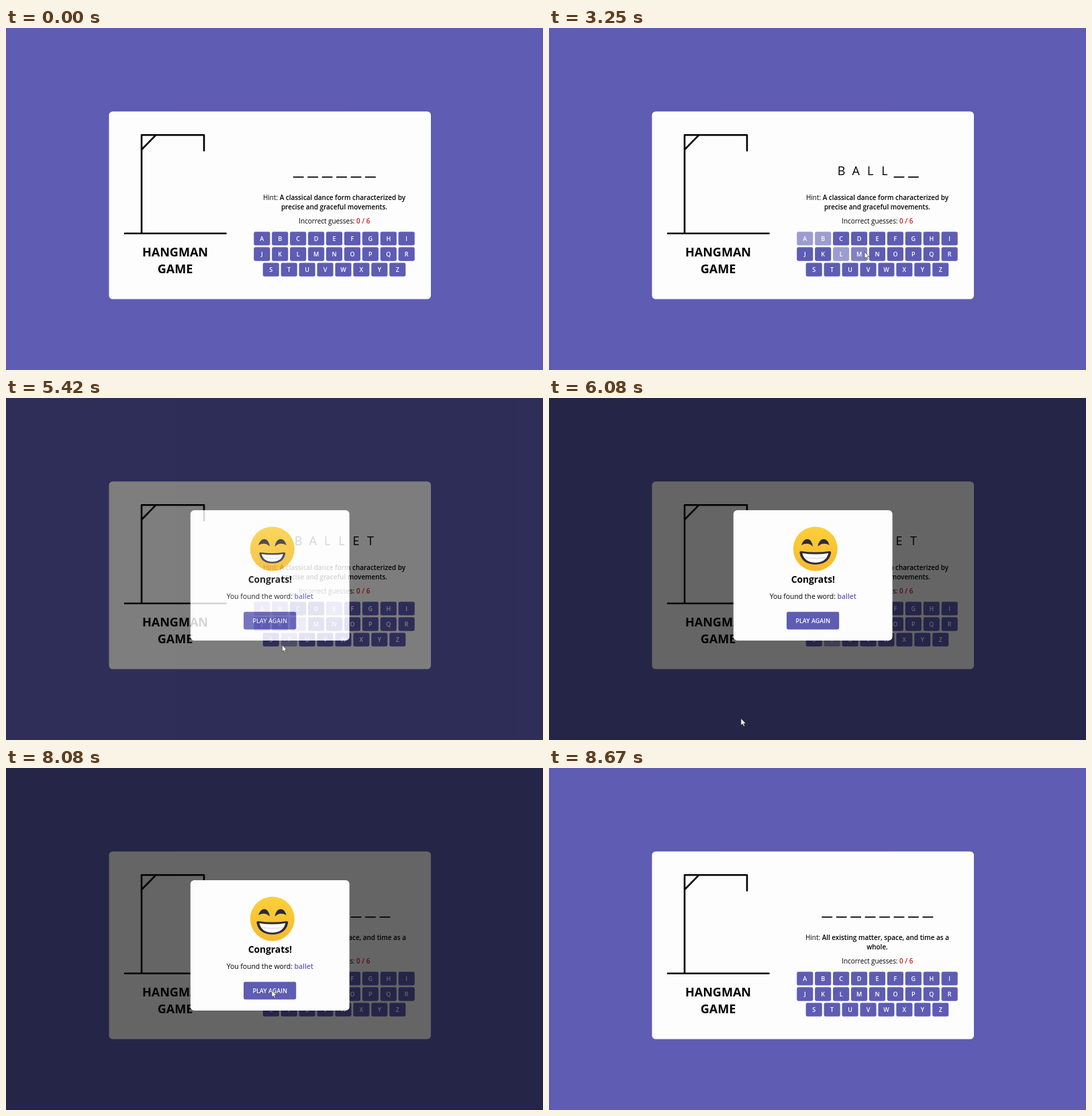
Write an HTML page that moves like this. It is 800 px wide and 509 px high and loops after 9010 ms.

```html
<!DOCTYPE html>
<html lang="en">
<head>
<meta charset="utf-8">
<title>Hangman Game</title>
<style>
  html, body { margin: 0; width: 100%; height: 100%; overflow: hidden; background: #5e5cb3; }
  svg { display: block; width: 100%; height: 100%; }
  text { font-family: "Open Sans", sans-serif; font-weight: 500; font-size: 9.93px; text-anchor: middle; }
  .bold { font-weight: 700; }
  b, tspan { font-weight: 600; }
  .title { font-size: 18.05px; }
  .letter { font-size: 18.05px; }
  .button { font-size: 9.03px; font-weight: 600; fill: #fff; }
  .red { fill: #c81e20; }
  .accent { fill: #5e5cb3; }
</style>
</head>
<body>
<svg viewBox="0 0 800 509">
  <rect width="800" height="509" fill="#5e5cb3"/>
  <rect x="153.4" y="124.2" width="479.6" height="279.4" rx="5.6" fill="#fefdfe"/>
  <path d="M177 305.8H327.5M202 305.8V159.2H295V182.5M202 181L223.5 159.2" fill="none" stroke="#000" stroke-width="2.6" stroke-linecap="round" stroke-linejoin="round"/>
  <text class="title bold" x="252" y="340.3">HANGMAN</text>
  <text class="title bold" x="252" y="364.5">GAME</text>
  <g id="word"></g>
  <g id="hint"></g>
  <text x="489.3" y="291.4">Incorrect guesses: <tspan class="red">0 / 6</tspan></text>
  <g id="keys"></g>

  <g id="modal">
    <rect width="800" height="509" fill-opacity=".6"/>
    <rect x="274.8" y="167" width="236.8" height="194" rx="5.6" fill="#fefdfe"/>
    <defs>
      <linearGradient id="skin" x2="0" y2="1">
        <stop stop-color="#fbd03a"/><stop offset="1" stop-color="#f6b92f"/>
      </linearGradient>
    </defs>
    <circle cx="396.8" cy="224.4" r="33" fill="url(#skin)"/>
    <g fill="#2d2b38">
      <path d="M376 219Q379 209.5 385.5 210Q391.500 211 393 221Q386 213.500 376 219Z"/>
      <path d="M400.500 221Q402 211 408.500 210Q415 209.500 417.800 219Q408 213.500 400.500 221Z"/>
      <g id="mouth">
        <path d="M-21-9.500Q0-6.500 21-9.500Q24-9.500 23.300-6.500Q20 10 0 10.200Q-20 10-23.300-6.500Q-24-9.500-21-9.500Z"/>
        <path d="M-19.500-6.500Q0-3.500 19.500-6.500Q16 7.300 0 7.500Q-16 7.300-19.500-6.500Z" fill="#fff"/>
        <path d="M-17 0Q0 2.500 17 0" fill="none" stroke="#c9c9d2" stroke-width=".8"/>
      </g>
    </g>
    <text class="bold" style="font-size:13.8px" x="393.3" y="275">Congrats!</text>
    <text style="font-size:10.38px" x="393.3" y="298.500">You found the word: <tspan class="accent">ballet</tspan></text>
    <rect x="354" y="318.200" width="78.200" height="26.200" rx="2.300" fill="#5e5cb3"/>
    <text class="button" x="393.200" y="334.600">PLAY AGAIN</text>
  </g>

  <path id="cursor" d="M0 0V10L2.300 8L4 11.600L5.600 10.900L4 7.400H7.200Z" fill="#fff" stroke="#333" stroke-width=".7"/>
</svg>
<script>
const LOOP = 9010, SHOW = 5205, RESET = 8080, FADE = 400;
const CX = 489;
const $ = id => document.getElementById(id);

const rounds = [
  { word: "BALLET", hint: ["A classical dance form characterized by", "precise and graceful movements."] },
  { word: "UNIVERSE", hint: ["All existing matter, space, and time as a", "whole."] }
];
const clicks = { B: 1330, A: 2080, L: 2620, E: 3670, T: 4830 };

// Pointer stops: time, x, y
const path = [
  [0, 452, 520], [80, 446, 477], [900, 407, 317], [1500, 407, 317],
  [1880, 378, 316], [2080, 378, 316], [2480, 431, 338], [2750, 431, 338],
  [2830, 452, 338], [3080, 452, 338], [3250, 470, 333], [3500, 488, 313],
  [3850, 488, 313], [4650, 420, 360], [5300, 420, 360], [6080, 286, 477],
  [7300, 286, 477], [7950, 396, 331], [8180, 396, 331], [8600, 396, 520]
];

const keys = ["ABCDEFGHI", "JKLMNOPQR", "STUVWXYZ"].flatMap((row, r) =>
  [...row].map((name, i) => ({
    name,
    x: CX + (i - (row.length - 1) / 2) * 26.93 - 12.05,
    y: 303.3 + r * 23.05
  })));

$("keys").innerHTML = keys.map(k =>
  `<g><rect x="${k.x}" y="${k.y}" width="24.1" height="20.3" rx="2.3"/>
   <text class="button" x="${k.x + 12.05}" y="${k.y + 13.4}">${k.name}</text></g>`).join("");
keys.forEach((k, i) => k.node = $("keys").children[i]);

const clamp = v => Math.max(0, Math.min(1, v));
const smooth = v => v * v * (3 - 2 * v);

// The CSS "ease" curve: cubic-bezier(.25, .1, .25, 1)
function ease(p) {
  let lo = 0, hi = 1, s = 0.5;
  const curve = (a, b) => 3 * a * s * (1 - s) ** 2 + 3 * b * s * s * (1 - s) + s ** 3;
  for (let i = 0; i < 20; i++) {
    s = (lo + hi) / 2;
    if (curve(.25, .25) < p) lo = s; else hi = s;
  }
  return curve(.1, 1);
}

function pointer(t) {
  const i = path.findIndex(p => p[0] > t);
  if (i < 0) return path.at(-1).slice(1);
  const [t0, x0, y0] = path[i - 1], [t1, x1, y1] = path[i];
  const k = smooth((t - t0) / (t1 - t0));
  return [x0 + (x1 - x0) * k, y0 + (y1 - y0) * k];
}

function drawWord(word, guessed) {
  $("word").innerHTML = [...word].map((c, i) => {
    const x = CX + 0.3 + (i - (word.length - 1) / 2) * 21.45;
    return guessed(c)
      ? `<text class="letter" x="${x}" y="218.6">${c}</text>`
      : `<rect x="${x - 7.9}" y="221" width="15.8" height="1.7"/>`;
  }).join("");
}

function drawHint([first, second]) {
  $("hint").innerHTML =
    `<text x="${CX}" y="256">Hint: <tspan>${first}</tspan></text>
     <text x="${CX}" y="269.6"><tspan>${second}</tspan></text>`;
}

function draw(t) {
  const { word, hint } = rounds[t < RESET ? 0 : 1];
  const guessed = c => t < RESET && t >= clicks[c];
  const [x, y] = pointer(t);
  const covered = t >= SHOW && t < RESET;

  drawWord(word, guessed);
  drawHint(hint);
  for (const k of keys) {
    const used = guessed(k.name);
    const hover = !used && !covered && x >= k.x && x < k.x + 24.1 && y >= k.y && y < k.y + 20.3;
    k.node.setAttribute("opacity", used ? 0.6 : 1);
    k.node.firstChild.setAttribute("fill", hover ? "#8381c5" : "#5e5cb3");
  }

  const alpha = ease(clamp((t - SHOW) / FADE)) - ease(clamp((t - RESET) / FADE));
  $("modal").setAttribute("opacity", alpha);

  const grin = smooth(clamp((t - 5250) / 750));
  const laugh = Math.sin(Math.PI * clamp((t - 6500) / 580));
  const size = 0.8 + 0.2 * grin - 0.15 * laugh;
  $("mouth").setAttribute("transform", `translate(396.8 237.5) scale(${size})`);
  $("cursor").setAttribute("transform", `translate(${x} ${y})`);
}

const start = performance.now();
function tick() {
  draw((performance.now() - start) % LOOP);
  requestAnimationFrame(tick);
}
tick();
</script>
</body>
</html>
```
